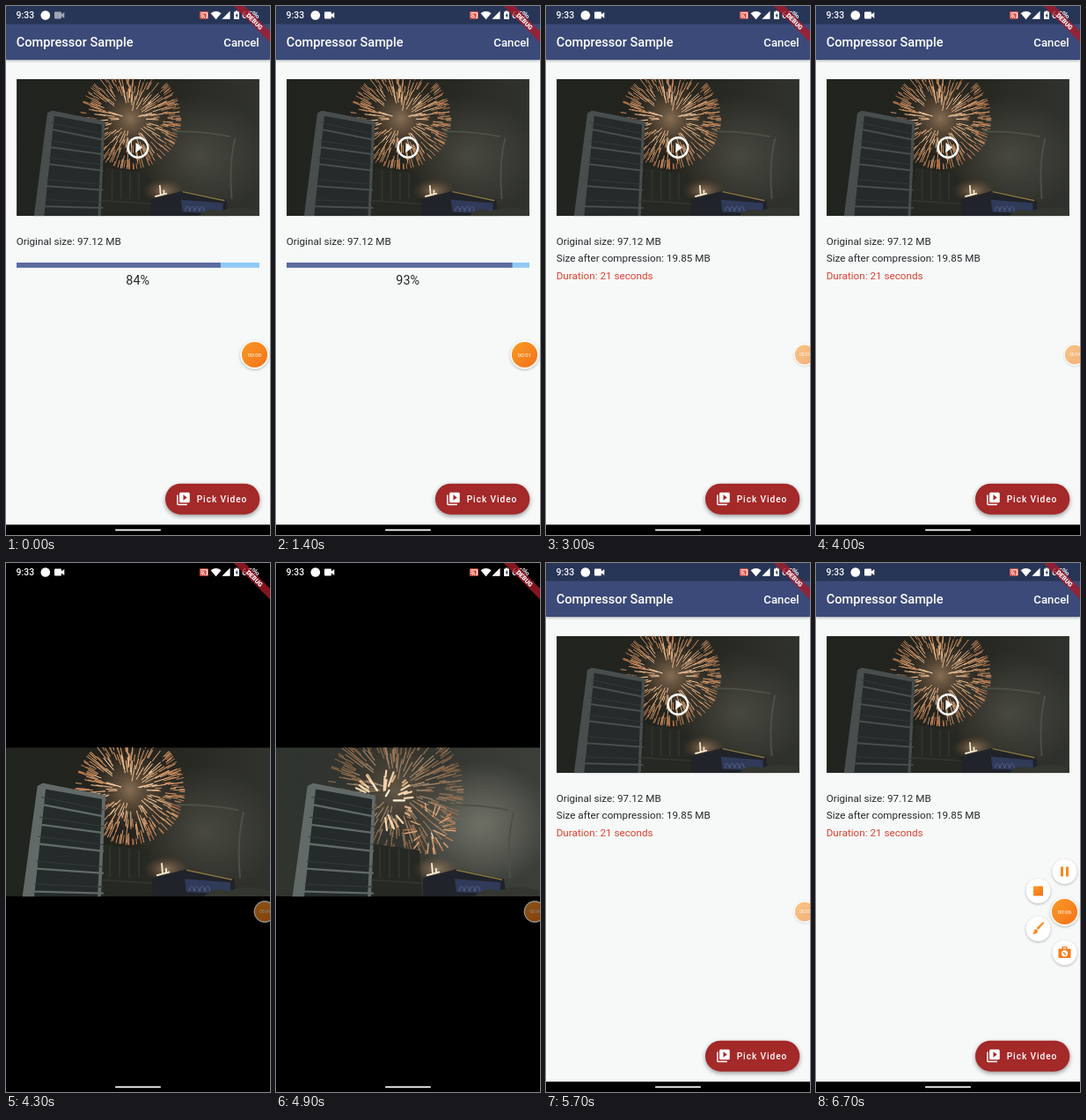
An HTML page that plays this animation: 300 px wide and 600 px high, repeating every 6.8 s.

```html
<!DOCTYPE html>
<html lang="en">
<head>
<meta charset="utf-8">
<title>Compressor Sample</title>
<style>
  html, body { margin: 0; width: 100%; height: 100%; overflow: hidden; background: #000; }
  #stage { display: block; width: 300px; height: 600px; font-family: Roboto, sans-serif; }
  .m { font-weight: 500; }
  .body { font-size: 11.7px; fill: #25282b; }
  .btn { fill: #fff; filter: drop-shadow(0 1px 1.5px #0004); }
</style>
</head>
<body>
<svg id="stage" viewBox="0 0 300 600">
  <defs>
    <linearGradient id="sky"><stop stop-color="#20241f"/><stop offset=".5" stop-color="#24231d"/><stop offset="1" stop-color="#30322d"/></linearGradient>
    <radialGradient id="smoke"><stop stop-color="#858579" stop-opacity=".6"/><stop offset="1" stop-color="#858579" stop-opacity="0"/></radialGradient>
    <radialGradient id="glow"><stop stop-color="#e8b98c" stop-opacity=".5"/><stop offset="1" stop-color="#a06a40" stop-opacity="0"/></radialGradient>
    <linearGradient id="orange" x2="1" y2="1"><stop stop-color="#fb9a24"/><stop offset="1" stop-color="#f4721a"/></linearGradient>
  </defs>

  <g id="page">
    <rect width="300" height="600" fill="#f6f9f8"/>
    <rect width="300" height="61" fill="#3b4a78" style="filter:drop-shadow(0 1px 1.5px #0005)"/>
    <rect width="300" height="20.5" fill="#273556"/>
    <g class="m" fill="#fff">
      <text x="11.7" y="46.3" font-size="14.6">Compressor Sample</text>
      <text x="247.3" y="46" font-size="13.2">Cancel</text>
    </g>
    <svg id="thumb" x="12" y="82.8" width="276" height="155.4" viewBox="0 0 300 169"></svg>
    <path fill="#fff" transform="translate(135 145.5) scale(1.25)" d="M10 16.5l6-4.5-6-4.5v9zM12 2C6.48 2 2 6.48 2 12s4.48 10 10 10 10-4.48 10-10S17.52 2 12 2zm0 18c-4.41 0-8-3.59-8-8s3.59-8 8-8 8 3.59 8 8-3.59 8-8 8z"/>
    <text class="body" x="11.7" y="270.7">Original size: 97.12 MB</text>
    <g id="progress">
      <rect x="12" y="291" width="276" height="5.8" fill="#8fc9f7"/>
      <rect id="bar" x="12" y="291" height="5.8" fill="#5c6ba0"/>
      <text id="percent" x="149.7" y="316.3" font-size="14.4" fill="#25282b" text-anchor="middle"></text>
    </g>
    <g id="result" class="body">
      <text x="11.7" y="290.3">Size after compression: 19.85 MB</text>
      <text x="11.7" y="310" fill="#de3f31">Duration: 21 seconds</text>
    </g>
    <rect x="181" y="541.7" width="107.3" height="35" rx="17.5" fill="#a42929" style="filter:drop-shadow(0 2.5px 2.5px #0006)"/>
    <path fill="#fff" transform="translate(192.7 550.2) scale(.73)" d="M4 6H2v14c0 1.1.9 2 2 2h14v-2H4V6zm16-4H8c-1.1 0-2 .9-2 2v12c0 1.1.9 2 2 2h12c1.1 0 2-.9 2-2V4c0-1.1-.9-2-2-2zm-8 12.5v-9l6 4.5-6 4.5z"/>
    <text class="m" x="216.7" y="562.8" font-size="10.2" letter-spacing=".91" fill="#fff">Pick Video</text>
    <rect y="588.3" width="300" height="12" fill="#000"/>
  </g>

  <rect id="black" width="300" height="600"/>
  <svg id="video" x="0" width="300" height="169" viewBox="0 0 300 169"></svg>

  <g fill="#fff">
    <text class="m" x="11.6" y="14.3" font-size="10.4">9:33</text>
    <circle cx="44.8" cy="10.5" r="5.3"/>
    <path id="cam" d="M56 6.5h6q1 0 1 1v2l3.300-2.500v7l-3.300-2.500v2q0 1-1 1h-6q-1 0-1-1v-6q0-1 1-1z"/>
    <rect x="220" y="6.300" width="10" height="8.400" rx="1" fill="#e2574c"/>
    <path d="M221.500 9.500q4 0 4 4M221.500 11.500q2 0 2 2M221.500 7.800h7v5.500h-1.500" fill="none" stroke="#fff" stroke-width="1"/>
    <path d="M232.600 8.300q6-4.500 12 0l-6 7z"/>
    <path d="M254.500 5.800v9h-9z" fill="#ffffff60"/>
    <path d="M254.500 5.800v9h-9l5.500-5.500zM260.800 6.500v-1h2.500v1h1.700v8.500h-6V6.500z"/>
    <path d="M262.600 7.800l-2 3.500h1.300v2.500l2-3.500h-1.300z" fill="#273556"/>
    <text class="m" x="268" y="14.300" font-size="10.400">65%</text>
    <rect x="124" y="593.500" width="52" height="1.700" rx=".85"/>
  </g>

  <path id="arrow" d="M18.500 332.500l-7.500 9.500 7.500 9.500" fill="none" stroke="#fff" stroke-width="2"/>

  <g id="menu">
    <g transform="translate(282.500 350)"><circle class="btn" r="14"/><path d="M-4.500-5.500h3v11h-3zM1.500-5.500h3v11h-3z" fill="#f68a20"/></g>
    <g transform="translate(252.500 372)"><circle class="btn" r="14"/><rect x="-5.500" y="-5.500" width="11" height="11" rx=".5" fill="url(#orange)"/></g>
    <g transform="translate(252.500 415)"><circle class="btn" r="14"/><path d="M7-7L0 1-2-1 5-7.500q1.500-.7 2 .5zM-2.500 0l2 2q0 4-6 4 2-1.500 1.500-3 .5-2.500 2.500-3z" fill="#f68a20"/></g>
    <g transform="translate(282.500 442)"><circle class="btn" r="14"/><path d="M-6.500-4.500h3.500v-2.500h6v2.500h3.500q.5 0 .5.500v9.500q0 .5-.5.500h-13q-.5 0-.5-.5V-4q0-.5.500-.5zM-1.700-5.700v1.200h3.400v-1.200z" fill="#f47c1c"/><circle cy=".8" r="3.600" fill="#fff"/><path d="M-1.500-.5l3 3" stroke="#f47c1c" stroke-width="1.500"/></g>
  </g>

  <g id="badge">
    <circle class="btn" r="16.300"/>
    <circle r="14.600" fill="url(#orange)"/>
    <text id="clock" y="2.200" font-size="6.200" fill="#fff" text-anchor="middle"></text>
  </g>

  <g transform="translate(300 0) rotate(45)">
    <rect x="-29.200" y="20.400" width="58.400" height="8.800" fill="#a81a2a" opacity=".78"/>
    <text y="27.400" font-size="7.200" font-weight="900" fill="#fff" text-anchor="middle">DEBUG</text>
  </g>
</svg>
<script>
const $ = id => document.getElementById(id);
const LOOP = 6800, STEP = 100;
const ramp = (t, a, b) => Math.min(1, Math.max(0, (t - a) / (b - a)));
const set = (id, attrs) => { for (const k in attrs) $(id).setAttribute(k, attrs[k]); };

function random(seed) {
  return () => (seed = seed * 16807 % 2147483647) / 2147483647;
}

// Radial streaks around 0,0, one path per colour
function burst(seed, count, radius, streak, width, colors) {
  const rnd = random(seed), paths = colors.map(() => '');
  for (let i = 0; i < count; i++) {
    const a = rnd() * 2 * Math.PI, r = radius * (.12 + .8 * Math.sqrt(rnd()));
    const end = Math.min(radius, r + streak * (.4 + rnd()));
    const at = d => (Math.cos(a) * d).toFixed(1) + ' ' + (Math.sin(a) * d).toFixed(1);
    const c = Math.min(colors.length - 1, Math.floor((r / radius * .75 + rnd() * .25) * colors.length));
    paths[c] += `M${at(r)}L${at(end)}`;
  }
  return paths.map((d, i) =>
    `<path d="${d}" stroke="${colors[i]}" stroke-width="${width}" stroke-linecap="round"/>`).join('');
}

function tower(side) {
  const floors = [[62, 75], [84, 93], [105, 113], [132, 137], [157, 159]];
  return `<path d="M21.500 169L38 42 44 39 109 52 104 169z" fill="#252a2b"/>
    <path d="M21.500 169L38 42 44 39 47 41 34 169z" fill="${side}"/>
    <path d="M38 42L44 39 109 52V57L44 45z" fill="${side}"/>
    <path d="M109 52L104 169H100.500L105.500 54z" fill="${side}"/>` +
    floors.map(([l, r]) => `<path d="M${47 - l / 13} ${l}L107 ${r}" stroke="${side}" stroke-width="2.200"/>
      <path d="M${47 - l / 13} ${l - 8}L107 ${r - 7}" stroke="#333938" stroke-width="1"/>`).join('');
}

function scene(fireworks, side, shift) {
  return `<rect width="300" height="169" fill="url(#sky)"/>
    <ellipse cx="225" cy="95" rx="85" ry="75" fill="url(#smoke)" opacity=".55"/>
    <g class="haze" opacity="0"><rect width="300" height="169" fill="#5c645f" opacity=".25"/>
      <ellipse cx="235" cy="85" rx="80" ry="70" fill="url(#smoke)"/></g>
    ${fireworks}
    <path d="M110 109L163 117 166 169H104z" fill="#262923"/>
    <path d="M118 112V148M129 113V148M140 115V148M151 116V148M106 150L166 154" stroke="#34372f" stroke-width="1.500"/>
    <path d="M193 65Q230 64 264 71M270 73Q262 105 266 148" fill="none" stroke="#4c5147" stroke-width="2"/>
    <ellipse cx="182" cy="138" rx="26" ry="15" fill="url(#glow)"/>
    <path d="M167 148L205 138 259 149 262 169H167z" fill="#202329"/>
    <path d="M203 149L255 153V166L205 164z" fill="#303a59"/>
    <path d="M208 163q3-12 6 0q3-12 6 0q3-12 6 0q3-12 6 0" fill="none" stroke="#596184" stroke-width="1"/>
    <path d="M205 139L257 150" stroke="#8a773e" stroke-width="1.500"/>
    <path d="M171 145L186 141M178 144L177 131M182 142V137" stroke="#fff0d8" stroke-width="1.800"/>
    <path d="M225 169q12-12 28-6 20-9 47 0v6z" fill="#33372f"/>
    <g transform="${shift}">${tower(side)}</g>`;
}

const warm = ['#ffe7c9', '#eebd91', '#cf9263', '#b5774d'];
const main = burst(77, 330, 62, 13, 1.05, warm);
const glow = '<circle r="45" fill="url(#glow)"/>';
$('thumb').innerHTML = scene(`<g transform="translate(141 49)">${glow}${main}</g>`, '#484e4d', '');
$('video').innerHTML = scene(
  `<g id="big">${glow}${main}</g>
   <g id="left">${burst(31, 34, 34, 15, 2.2, ['#fff0d8', '#f3d3ac', '#d9ac80'])}</g>
   <g id="right">${burst(58, 34, 29, 13, 1.4, ['#f7dcb8', '#dba67a', '#b9794d'])}</g>`,
  '#626a68', 'translate(-5.700 0) scale(1.090 1.040)');
const haze = $('video').querySelector('.haze');

function draw(t) {
  const value = Math.min(100, 84 + t * .0064);
  set('bar', { width: 276 * value / 100 });
  $('percent').textContent = Math.round(value) + '%';
  set('progress', { opacity: t < 2700 ? 1 : 0 });
  set('result', { opacity: t < 2700 ? 0 : 1 });

  // Player opens with a cut, leaves by sinking and fading
  const exit = ramp(t, 5400, 5600), age = ramp(t, 4300, 4900), late = ramp(t, 4900, 5600);
  set('black', { opacity: t >= 4100 && t <= 5400 ? 1 : 0 });
  set('video', { y: 209.300 + 16 * exit, opacity: t >= 4300 ? 1 - exit : 0 });
  set('big', { transform: `translate(${141 - 5 * age} 48) scale(${1 + .24 * age + .05 * late})`, opacity: 1 - .45 * age - .45 * late });
  const bloom = (id, x, y, grow) => set(id, {
    transform: `translate(${x + 4 * late} ${y - 6 * late}) scale(${Math.max(.01, grow) + .12 * late})`,
    opacity: grow > 0 ? 1 - .25 * late : 0
  });
  bloom('left', 122, 60, ramp(t, 4400, 4900));
  bloom('right', 175, 92, ramp(t, 4500, 4900));
  haze.setAttribute('opacity', age);

  set('arrow', { transform: `translate(${-20 * (1 - ramp(t, 5000, 5300))} 0)`, opacity: .9 * (1 - ramp(t, 5500, 5800)) });
  set('cam', { opacity: t < 100 ? .55 : 1 });

  // Recorder bubble docks and dims, then opens its menu
  const open = ramp(t, 6500, 6700), docked = t < 6600;
  const dock = docked ? ramp(t, 1400, 1700) : 0, dim = docked ? ramp(t, 1900, 2100) : 0;
  set('badge', {
    transform: `translate(${282.500 + 11.500 * dock} 395.500) scale(${1 - .24 * dim})`,
    opacity: 1 - .45 * dim
  });
  $('clock').textContent = '00:0' + Math.floor(t / 1000);
  set('menu', { transform: `translate(282.500 395.500) scale(${open}) translate(-282.500 -395.500)`, opacity: open });
}

function tick() {
  draw(Math.floor(performance.now() % LOOP / STEP) * STEP);
  requestAnimationFrame(tick);
}
tick();
</script>
</body>
</html>
```
